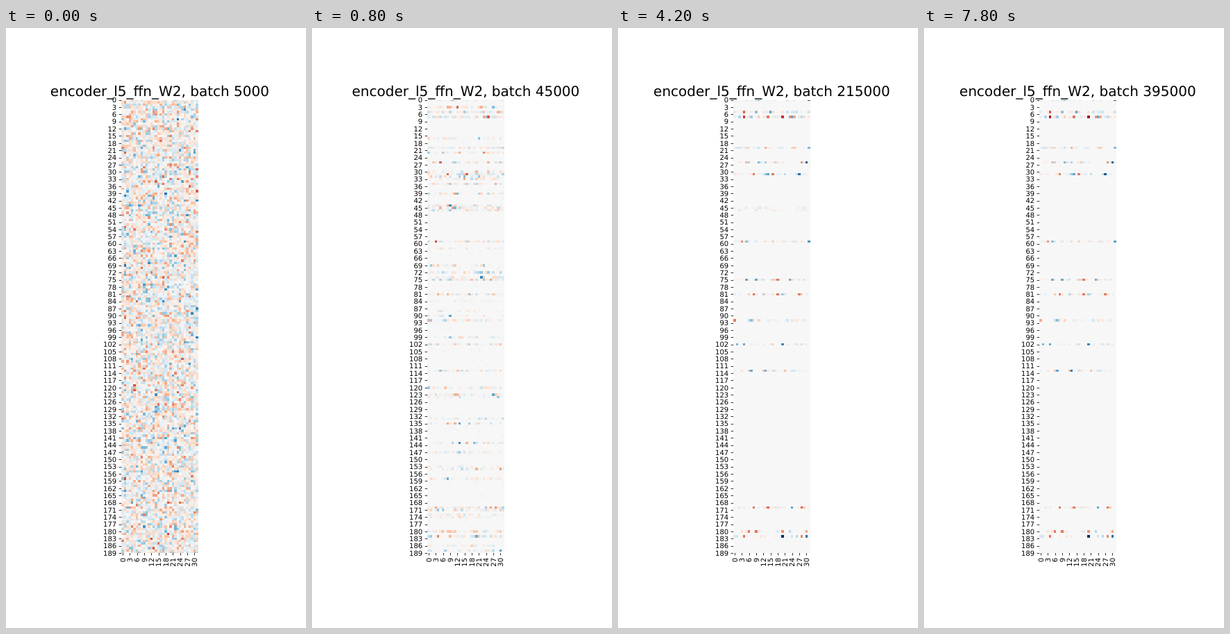
An HTML page with a canvas for the animation above (8000 ms loop, 432x864 px).

```html
<!DOCTYPE html>
<html lang="en">
<head>
<meta charset="utf-8">
<title>Weight heatmap</title>
<style>
  html, body { margin: 0; width: 100%; height: 100%; overflow: hidden; background: #fff; }
  canvas { display: block; }
</style>
</head>
<body>
<canvas id="stage" width="432" height="864"></canvas>
<script>
const ctx = document.getElementById('stage').getContext('2d');
const ROWS = 190, COLS = 32, STEPS = 40, STEP_MS = 200;
const THIN = 2, SETTLED = 9;   // steps at which the matrix has thinned out, then settled
const TOP = 103.68, BOTTOM = 756, MID = 221.4;
const CELL = (BOTTOM - TOP) / (ROWS - 1);
const LEFT = MID - CELL * COLS / 2;
const FONT = '"DejaVu Sans", Verdana, sans-serif';

// Diverging palette, blue to red
const PALETTE = ['#053061', '#2166ac', '#4393c3', '#92c5de', '#d1e5f0', '#f7f7f7',
  '#fddbc7', '#f4a582', '#d6604d', '#b2182b', '#67001f']
  .map(h => [1, 3, 5].map(k => parseInt(h.slice(k, k + 2), 16)));

// Rows that survive, leave slowly, or vanish early
const lasting = new Set([0, 5, 7, 20, 26, 31, 45, 46, 59, 75, 81, 92, 102, 113, 170, 180, 182]);
const leaving = new Set([45, 46]);
const brief = new Set([3, 16, 22, 32, 35, 39, 44, 72, 74, 120, 123, 143, 147, 154, 171, 188]);
const pale = new Set([30, 33, 62, 69, 84, 88, 90, 99, 124, 133, 135, 153, 158, 173, 174, 186]);

// The strongest cells: row, column, early and late value
const landmarks = new Map([
  [0, 31, -0.85, -0.85], [5, 4, 0.58, 0.6], [7, 4, 0.4, 0.82], [7, 20, 0.45, 0.86],
  [26, 30, -0.88, -0.82], [31, 27, -0.45, -0.88], [59, 31, -0.75, -0.52], [92, 0, 0.95, 0.35],
  [102, 20, -0.65, -0.65], [113, 13, 0.2, -0.78], [170, 14, 0.75, 0.5], [170, 28, 0.78, 0.5],
  [182, 20, -1, -1], [182, 30, -0.75, -0.75]
].map(([r, c, from, to]) => [r * COLS + c, {from, to}]));

function randomizer(seed) {
  return () => {
    seed = seed + 0x6D2B79F5 | 0;
    let t = Math.imul(seed ^ seed >>> 15, 1 | seed);
    t = t + Math.imul(t ^ t >>> 7, 61 | t) ^ t;
    return ((t ^ t >>> 14) >>> 0) / 4294967296;
  };
}
const rand = randomizer(51);
const gauss = () => Math.sqrt(-2 * Math.log(1 - rand())) * Math.cos(2 * Math.PI * rand());
const clamp = (v, lo, hi) => Math.max(lo, Math.min(hi, v));
const mix = (a, b, t) => a + (b - a) * t;
const shrink = (v, by) => Math.sign(v) * Math.max(0, Math.abs(v) - by);

// Mostly faint values with a few strong ones
function sparse(scale, limit) {
  const g = gauss();
  return clamp(scale * g * Math.abs(g), -limit, limit);
}

function strength(r) {
  if (lasting.has(r)) return 0.18;
  if (brief.has(r)) return 0.15;
  return pale.has(r) ? 0.08 : 0.006;
}

const makeGrid = cell => Array.from({length: ROWS}, (_, r) =>
  Array.from({length: COLS}, (_, c) => cell(r, c)));

const noise = makeGrid(() => clamp(gauss() * 0.21, -0.75, 0.7));
const kept = makeGrid(() => sparse(0.12, 0.55));
const thin = makeGrid((r, c) => {
  const v = sparse(strength(r), 0.9);
  return lasting.has(r) ? mix(v, kept[r][c], 0.4) : v;
});

function settled(step, r, c) {
  const age = Math.max(0, step - SETTLED);
  const ease = 1 - Math.exp(-age / 10);
  const mark = landmarks.get(r * COLS + c);
  if (mark) return mix(mark.from, mark.to, ease);
  const v = shrink(kept[r][c], 0.03 * ease);
  return leaving.has(r) ? v * Math.max(0, 1 - age / 16) : v;
}

function weight(step, r, c) {
  if (step < THIN) return mix(noise[r][c], thin[r][c], step * 0.6);
  const t = Math.min(1, (step - THIN) / (SETTLED - THIN));
  return mix(thin[r][c], lasting.has(r) ? settled(step, r, c) : 0, t);
}

function color(v) {
  const p = (clamp(v, -1, 1) + 1) * 5;
  const k = Math.min(9, Math.floor(p));
  const rgb = PALETTE[k].map((a, n) => Math.round(mix(a, PALETTE[k + 1][n], p - k)));
  return `rgb(${rgb})`;
}

const edgeX = c => Math.round(LEFT + c * CELL);
const edgeY = r => Math.round(clamp(TOP + (r - 0.5) * CELL, TOP, BOTTOM));

function drawCells(step) {
  for (let r = 0; r < ROWS; r++) {
    const y = edgeY(r), h = edgeY(r + 1) - y;
    for (let c = 0; c < COLS; c++) {
      const x = edgeX(c);
      ctx.fillStyle = color(weight(step, r, c));
      ctx.fillRect(x, y, edgeX(c + 1) - x, h);
    }
  }
}

function drawAxes() {
  ctx.fillStyle = '#000';
  ctx.font = '10px ' + FONT;
  ctx.textAlign = 'right';
  for (let r = 0; r < ROWS; r += 3) {
    const y = TOP + r * CELL;
    ctx.fillRect(LEFT - 3.5, Math.round(y), 3.5, 0.8);
    ctx.fillText(r, LEFT - 7, Math.round(y + 3.7));
  }
  for (let c = 0; c < COLS; c += 3) {
    const x = LEFT + (c + 0.5) * CELL;
    ctx.fillRect(Math.round(x), BOTTOM, 0.8, 3.5);
    ctx.save();
    ctx.translate(Math.round(x + 3.7), BOTTOM + 7);
    ctx.rotate(-Math.PI / 2);
    ctx.fillText(c, 0, 0);
    ctx.restore();
  }
}

function draw(step) {
  ctx.fillStyle = '#fff';
  ctx.fillRect(0, 0, 432, 864);
  drawCells(step);
  drawAxes();
  ctx.font = '20px ' + FONT;
  ctx.textAlign = 'center';
  ctx.fillText('encoder_l5_ffn_W2, batch ' + (5000 + step * 10000), MID, 98);
}

ctx.textRendering = 'geometricPrecision';
const start = performance.now();
let shown = -1;
function tick() {
  const step = Math.floor((performance.now() - start) / STEP_MS) % STEPS;
  if (step !== shown) draw(shown = step);
  requestAnimationFrame(tick);
}
tick();
</script>
</body>
</html>
```
